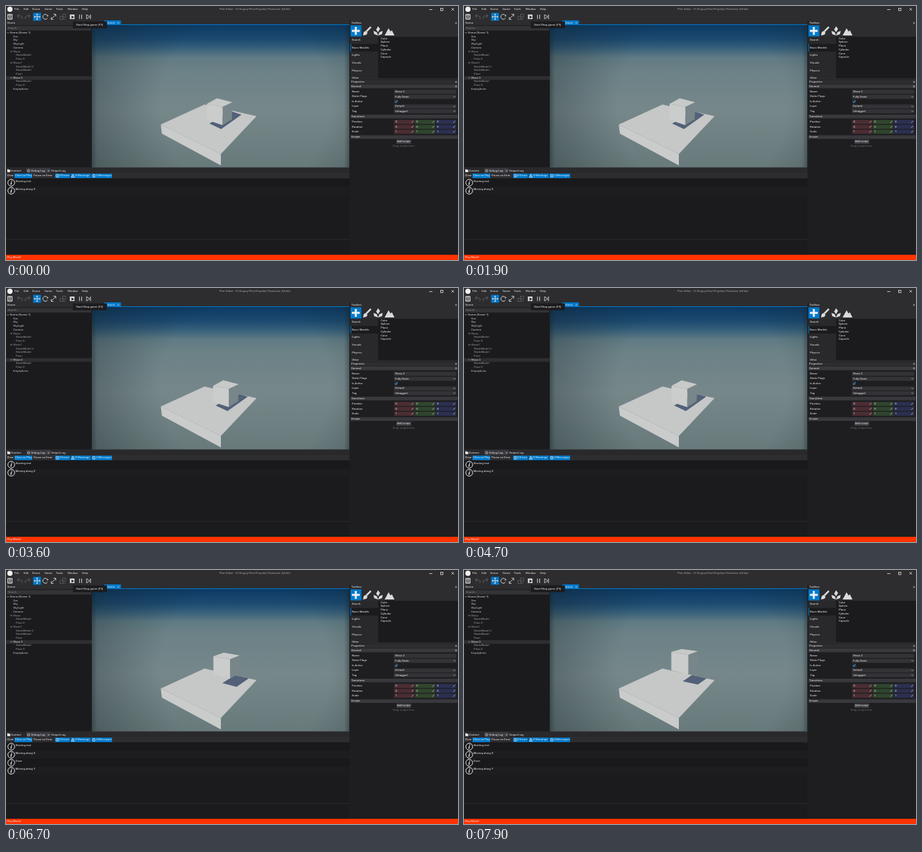
These frames come from a looping animation (690x388 px, 8 s). An HTML page with a canvas:

```html
<!DOCTYPE html>
<html lang="en">
<head>
<meta charset="utf-8">
<title>Editor play mode</title>
<style>
html, body { margin: 0; width: 690px; height: 388px; overflow: hidden; background: #2d2d30; }
canvas { position: absolute; left: 0; top: 0; }
span { position: absolute; font: 4.4px/6px Roboto, Arial, sans-serif; white-space: pre; color: #f0f0f0; }
.mid { transform: translateX(-50%); }
</style>
</head>
<body>
<canvas id="ui" width="690" height="388"></canvas>
<canvas id="view" width="690" height="388"></canvas>
<script>
const LOOP = 8000, TAU = 1750, Y_START = 5250;
const BLUE = '#007acc', DARK = '#1b1b1d', PANEL = '#2d2d30', BAR = '#38383d';
const LIGHT = '#f0f0f0', ICON = '#dadada', DIM = '#9b9b9d';
const ui = document.getElementById('ui').getContext('2d');
const view = document.getElementById('view').getContext('2d');

function text(x, y, str, color = LIGHT, mid = false) {
  const el = document.createElement('span');
  el.textContent = str;
  el.style.cssText = `left:${x}px;top:${y - 3}px;color:${color}`;
  if (mid) el.className = 'mid';
  document.body.append(el);
  return el;
}

function rect(x, y, w, h, color, g = ui) {
  g.fillStyle = color;
  g.fillRect(x, y, w, h);
}

function trace(g, pts) {
  g.beginPath();
  pts.forEach(p => g.lineTo(p[0], p[1]));
}

function poly(g, pts, color) {
  trace(g, pts);
  g.closePath();
  g.fillStyle = color;
  g.fill();
}

function line(pts, color = ICON, w = .9, g = ui) {
  trace(g, pts);
  g.strokeStyle = color;
  g.lineWidth = w;
  g.stroke();
}

function box(x, y, w, h, color = ICON) {
  ui.strokeStyle = color;
  ui.lineWidth = .9;
  ui.strokeRect(x, y, w, h);
}

function ring(x, y, r, color = LIGHT, w = 1, from = 0, to = Math.PI * 2, g = ui) {
  g.beginPath();
  g.arc(x, y, r, from, to);
  g.strokeStyle = color;
  g.lineWidth = w;
  g.stroke();
}

function cross(x, y, r = 1.3, color = ICON, w = .6) {
  line([[x - r, y - r], [x + r, y + r]], color, w);
  line([[x - r, y + r], [x + r, y - r]], color, w);
}

function arrowTip(x, y, dx, dy) {
  poly(ui, [[x + dx, y + dy], [x - dy, y + dx], [x + dy, y - dx]], ICON);
}

function titleBar() {
  rect(0, 0, 690, 388, PANEL);
  ui.beginPath();
  ui.arc(6, 5, 4, 0, 7);
  ui.fillStyle = LIGHT;
  ui.fill();
  [[13, 'File'], [27, 'Edit'], [40, 'Scene'], [59, 'Game'], [76, 'Tools'], [94, 'Window'], [116, 'Help']]
    .forEach(([x, s]) => text(x, 5, s));
  text(380, 5, "Plim Editor - 'D:\\Enginy\\Flax\\Projekty\\Thekovba' (64-bit)", '#a8a8aa', true);
  line([[646, 5.5], [651, 5.5]]);
  box(663.5, 3.5, 3.5, 3.5);
  cross(682, 5, 2, ICON, .8);
}

function toolbar() {
  box(2.5, 13, 7, 7);
  box(4.2, 13, 3.6, 2);
  box(4.2, 17, 3.6, 3);
  for (const [x, d] of [[21, 1], [33, -1]]) {
    line([[x - 3 * d, 15], [x + d, 15], [x + 4 * d, 17], [x + 3 * d, 20]], '#626264');
    line([[x - d, 12.5], [x - 4 * d, 15], [x - d, 18]], '#626264');
  }
  rect(41.5, 10.5, 12, 12, BLUE);
  line([[47.5, 13], [47.5, 20]]);
  line([[44, 16.5], [51, 16.5]]);
  arrowTip(47.5, 13.2, 0, -1.8);
  arrowTip(47.5, 19.8, 0, 1.8);
  arrowTip(44.2, 16.5, -1.8, 0);
  arrowTip(50.8, 16.5, 1.8, 0);
  ring(60, 16.5, 3.8, ICON, 1, .5, 5.6);
  arrowTip(63, 14.5, 1.5, 1);
  line([[69, 20], [76, 13]]);
  line([[72.5, 12.5], [76, 12.5], [76, 16]]);
  line([[69, 17], [69, 20.5], [72.5, 20.5]]);
  box(82.5, 16, 4.5, 4.5, '#5c5c5e');
  box(86.5, 12.5, 4.5, 4.5, '#5c5c5e');
  line([[87, 20], [91, 20]], '#5c5c5e');
  rect(97.5, 13, 7, 7, ICON);
  poly(ui, [[100, 14.5], [104, 17], [100, 19.5]], PANEL);
  rect(111.7, 13.2, 1, 6.6, ICON);
  rect(115, 13.2, 1, 6.6, ICON);
  line([[123, 13.2], [128, 16.5], [123, 19.8], [123, 13.2]]);
  rect(128.5, 13, 1, 7, ICON);
}

function sceneTree() {
  text(2, 25.5, 'Scene');
  rect(0, 29.5, 131, 217, DARK);
  rect(1, 30.5, 129, 7, '#333337');
  text(3, 34, 'Search...', '#8a8a8c');
  rect(0, 107.2, 131, 5.6, '#2e2e32');
  const rows = [[6, 'Scene (Scene 1)'], [11, 'Sun'], [11, 'Sky'], [11, 'SkyLight'], [11, 'Camera'],
    [11, 'Show'], [15, 'StaticModel'], [15, 'Floor 0'], [11, 'Show1'], [15, 'StaticModel 2'],
    [15, 'StaticModel'], [15, 'Floor'], [11, 'Show 2'], [15, 'StaticModel'], [15, 'Floor 0'], [11, 'EmptyActor']];
  rows.forEach(([x, s], i) => {
    const y = 41 + i * 5.73;
    const color = i === 0 || i === 12 ? LIGHT : x === 15 || s.startsWith('Show') ? DIM : '#c8c8ca';
    text(x, y, s, color);
    if (i === 0 || s.startsWith('Show')) line([[x - 4.5, y - 1], [x - 3, y + .7], [x - 1.5, y - 1]], '#bbb', .7);
  });
}

function viewTab() {
  rect(150, 22, 25.5, 7, BLUE);
  text(154.5, 26, 'Game');
  cross(171.5, 25.8);
  rect(131, 28, 393.5, 1, BLUE);
}

function toolbox() {
  text(527, 26, 'Toolbox');
  cross(687, 26);
  rect(525.5, 29.5, 17, 17, BLUE);
  line([[534, 32], [534, 44]], LIGHT, 3);
  line([[528, 38], [540, 38]], LIGHT, 3);
  line([[550, 39], [557, 32]], ICON, 2.5);
  poly(ui, [[545, 45], [546, 40], [549, 38], [552, 41], [550, 44]], ICON);
  poly(ui, [[568, 31], [571, 35], [568, 40], [565, 36]], ICON);
  poly(ui, [[561, 38], [566, 40], [568, 45], [562, 43]], ICON);
  poly(ui, [[575, 38], [570, 40], [568, 45], [574, 43]], ICON);
  poly(ui, [[578, 45], [584, 34], [587, 39], [589, 37], [593, 45]], ICON);
  rect(525.5, 47, 42.5, 63.5, '#29292c');
  rect(568, 47, 122, 63.5, DARK);
  rect(525.5, 58, 42.5, 11.5, DARK);
  rect(525.5, 58, 1.4, 11.5, BLUE);
  ['Search', 'Basic Models', 'Lights', 'Visuals', 'Physics'].forEach((s, i) => text(528, 52.3 + i * 11.55, s));
  const cut = text(528, 110, 'Other');
  cut.style.height = '3.5px';
  cut.style.overflow = 'hidden';
  ['Cube', 'Sphere', 'Plane', 'Cylinder', 'Cone', 'Capsule'].forEach((s, i) => text(572, 49.6 + i * 5.75, s));
}

function section(y, name) {
  rect(525.5, y - 3, 164, 5.6, BAR);
  text(527, y, name);
}

function properties() {
  rect(525.5, 112, 164.5, 1, '#232325');
  rect(525.5, 119.5, 164.5, 260.5, '#1e1e20');
  text(527, 116, 'Properties');
  cross(687, 116);
  section(123, 'General');
  ring(687, 122.8, 1.2, '#aaa', .8);
  ['Name', 'Static Flags', 'Is Active', 'Layer', 'Tag'].forEach((s, i) => text(528, 131 + i * 7.4, s));
  [[131, 'Show 2'], [138.6, 'Fully Static'], [153.4, 'Default'], [160.6, 'Untagged']].forEach(([y, s], i) => {
    rect(592, y - 3, 95.5, 6.2, '#333337');
    text(594, y, s);
    if (i) line([[683, y - .8], [684.5, y + .7], [686, y - .8]], '#ccc', .7);
  });
  rect(593, 143.3, 5.2, 5.2, '#333337');
  line([[593.7, 146], [595, 147.5], [597.6, 144.2]], '#1c97ea', 1.1);
  section(169, 'Transform');
  const tints = ['#4a2d33', '#2f452d', '#2b2f50'];
  ['Position', 'Rotation', 'Scale'].forEach((s, r) => {
    const y = 177 + r * 7.5;
    text(528, y, s);
    tints.forEach((c, k) => {
      const x = 592.5 + k * 31.8;
      rect(x, y - 3, 31, 6.2, c);
      text(x + 2, y, r === 2 ? '1' : '0');
      line([[x + 26.5, y + 1.5], [x + 29.5, y - 1.5]], '#ccc', .8);
    });
  });
  section(200.4, 'Scripts');
  rect(596, 204, 22.5, 6.5, '#3f3f46');
  text(607, 207.2, 'Add script', LIGHT, true);
  text(607, 214.3, 'Drag scripts here', '#707073', true);
}

function pill(x, w, triangle) {
  rect(x, 256, w, 7, BLUE);
  if (triangle) line([[x + 3.5, 257], [x + 5.8, 261.5], [x + 1.2, 261.5], [x + 3.5, 257]], LIGHT, .7);
  else ring(x + 3.5, 259.4, 2.2, LIGHT, .7);
  rect(x + 3.2, 258.3, .7, 2.3, LIGHT);
}

function logPanel() {
  rect(0, 247, 524.5, 8, '#29292c');
  rect(31, 247.5, 37, 7.5, '#3a3a40');
  poly(ui, [[2, 249.5], [4, 249.5], [4.7, 250.3], [6.5, 250.3], [6.5, 253.7], [2, 253.7]], LIGHT);
  text(7.5, 251.7, 'Content');
  ring(34.5, 251.7, 1.7, LIGHT, .7);
  text(38.5, 251.7, 'Debug Log');
  cross(65, 251.7);
  text(69, 251.7, 'Output Log');
  text(1.5, 259.2, 'Clear');
  rect(13, 256, 27, 7, BLUE);
  text(14, 259.2, 'Clear on Play');
  text(42, 259.2, 'Pause on Error');
  pill(75, 22.5);
  pill(98.5, 31, true);
  pill(130.5, 31.5);
  text(81.5, 259.2, '0 Errors');
  text(105.5, 259.2, '0 Warnings');
  rect(0, 263.3, 524.5, 93, DARK);
  rect(0, 357.3, 524.5, 22.7, DARK);
  rect(524.5, 22, 1, 358, '#19191b');
  rect(0, 380, 690, 8, '#ff3300');
  text(1.5, 384, 'Play Mode!');
}

function logRow(i) {
  const y = 263.8 + i * 12.25;
  rect(0, y, 524.5, 12.25, i % 2 ? '#1d1d1f' : '#19191b', view);
  ring(8, y + 6.1, 5.2, LIGHT, 1, 0, Math.PI * 2, view);
  poly(view, [[7.6, y + 5], [9, y + 5], [8.2, y + 9.2], [6.8, y + 9.2]], LIGHT);
  rect(8.1, y + 2.8, 1.4, 1.3, LIGHT, view);
}

const sky = view.createLinearGradient(0, 29, 0, 246);
[[0, '#0c3a64'], [.1, '#1c4a70'], [.16, '#355f7a'], [.23, '#607b84'], [.32, '#6c8286'], [.6, '#76878a'], [1, '#687a7b']]
  .forEach(([p, c]) => sky.addColorStop(p, c));
const shade = view.createRadialGradient(365, 150, 130, 365, 150, 260);
shade.addColorStop(0, 'rgba(20,32,38,0)');
shade.addColorStop(1, 'rgba(20,32,38,.36)');
const rim = view.createLinearGradient(131, 0, 524, 0);
[[0, .35], [.02, 0], [.98, 0], [1, .35]].forEach(([p, a]) => rim.addColorStop(p, `rgba(20,32,38,${a})`));

const TOP = [[236.3, 181], [303, 150.5], [382.5, 168.2], [328, 226]];
// Corner pairs: resting pose and fully raised pose
const ROOF = [[[317, 149.5], [316.5, 125]], [[332.5, 141], [332.5, 120.7]], [[356, 147], [357, 124]], [[341, 154], [342.5, 129.5]]];
const FOOT = [[[317, 174], [316.5, 153]], [[341, 182], [342.5, 160]], [[355.5, 173], [356.5, 152]]];
const SHADOW = [[[321, 179.5], [334, 170]], [[339, 188], [357, 175]], [[370, 166], [372, 164.5]], [[355, 161], [350, 159]]];

const ease = t => t > 0 ? 1 - Math.exp(-t / TAU) : 0;

function drawScene(t) {
  const slide = 11 * ease(Math.min(t, Y_START)) - 10.5;
  const lift = ease(t - Y_START) / .78;
  const place = pairs => pairs.map(([a, b]) => [a[0] + (b[0] - a[0]) * lift + slide, a[1] + (b[1] - a[1]) * lift]);
  const g = view;
  [sky, shade, rim].forEach(fill => rect(131, 29, 393, 217.5, fill, g));

  poly(g, [TOP[0], TOP[3], [328, 243.6], [238, 195]], '#cacbcb');
  poly(g, TOP, '#c6c7c7');

  g.save();
  trace(g, TOP);
  g.clip();
  poly(g, place(SHADOW), '#526178');
  g.restore();

  const [left, back, right, front] = place(ROOF);
  const [footL, footF, footR] = place(FOOT);
  poly(g, [front, right, footR, footF], '#788689');
  poly(g, [left, front, footF, footL], '#cbcccc');
  poly(g, [left, back, right, front], '#c8c9c9');
}

titleBar();
toolbar();
sceneTree();
viewTab();
toolbox();
properties();
logPanel();

const count = text(137.5, 259.2, '');
const entries = ['Starting test', 'Moving along X', 'Done', 'Moving along Y']
  .map((s, i) => text(14.5, 267.5 + i * 12.2, s));
text(107, 28.7, 'Start/Stop game (F5)');

function frame(now) {
  const t = now % LOOP;
  const shown = t < Y_START ? 2 : 4;
  view.clearRect(0, 0, 690, 388);
  drawScene(t);
  rect(102, 23.5, 52, 10.5, '#1c1c1e', view);
  entries.forEach((el, i) => {
    el.style.visibility = i < shown ? 'visible' : 'hidden';
    if (i < shown) logRow(i);
  });
  const label = shown + ' Messages';
  if (count.textContent !== label) count.textContent = label;
  requestAnimationFrame(frame);
}
requestAnimationFrame(frame);
</script>
</body>
</html>
```
